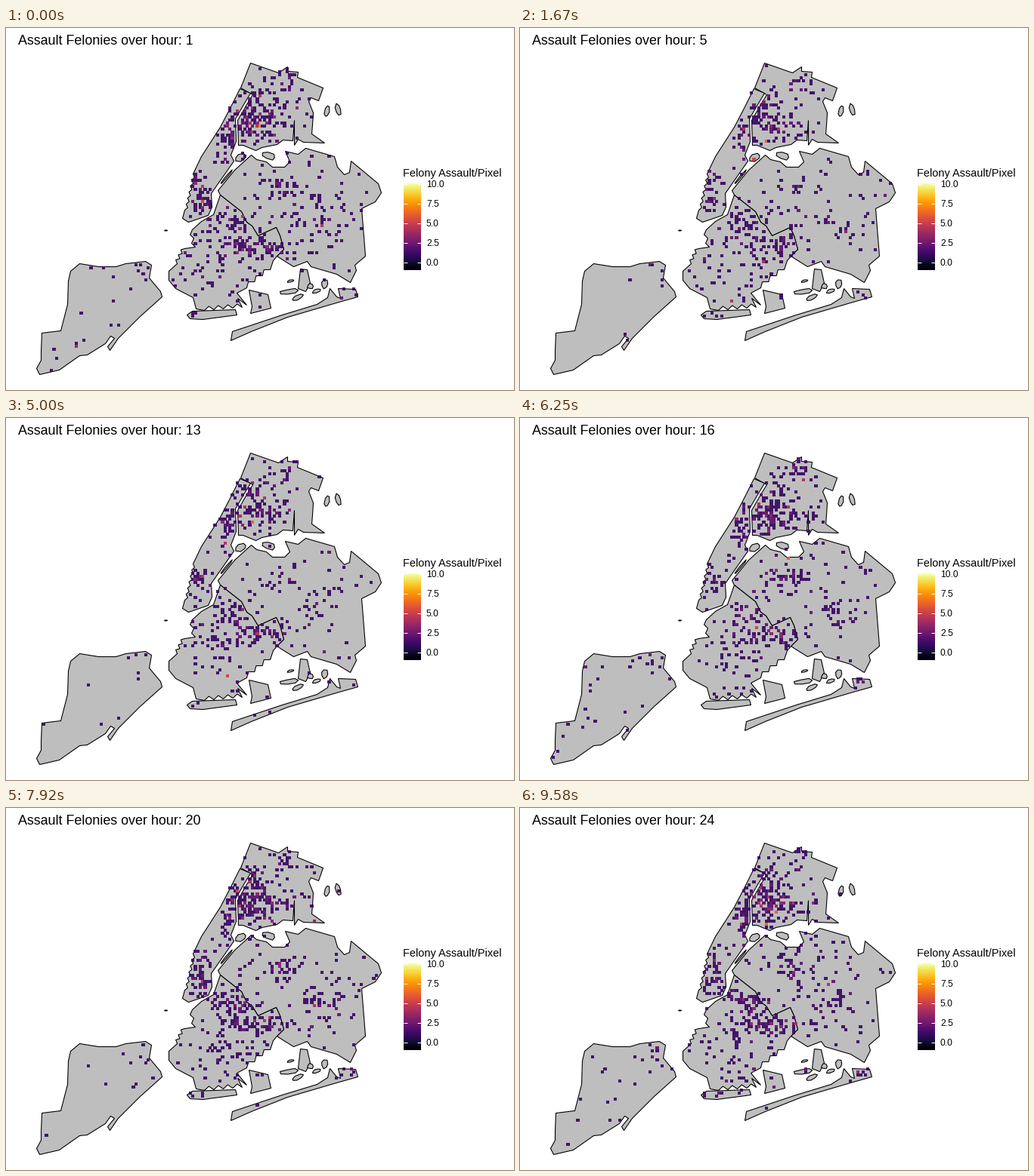
These frames come from a looping animation (672x480 px, 10000 ms). A matplotlib script:

```python
import numpy as np
import matplotlib.pyplot as plt
from matplotlib.animation import FuncAnimation
from matplotlib.patches import Polygon
from matplotlib.path import Path

W, H, DPI = 672, 480, 96
HOURS, LOOP_MS, STEP_MS = 24, 10000, 40
PX = 72 / DPI                      # points per pixel
CELL_X0, CELL_W, CELL_H = 42.1, 3.28, 4
COLS, ROWS = 140, 115
V_MIN, V_MAX = -1, 10
INFERNO = plt.get_cmap("inferno")

fig = plt.figure(figsize=(W / DPI, H / DPI), dpi=DPI, facecolor="white")
ax = fig.add_axes([0, 0, 1, 1])
ax.axis("off")

shapes = []
shape_rng = np.random.default_rng(3)


def land(points):
    shapes.append(Path(points))
    ax.add_patch(Polygon(np.array(points) + 0.5, closed=True, fc="#bebebe", ec="black",
                         lw=1.1 * PX, joinstyle="miter", zorder=1))


def jag(start, end, teeth, depth):
    """Zigzag shore from start to end, cutting in to one side."""
    (x0, y0), (x1, y1) = start, end
    t = np.linspace(0, 1, 2 * teeth + 1)
    cut = depth * (np.arange(len(t)) % 2) / np.hypot(x1 - x0, y1 - y0)
    return list(zip(x0 + t * (x1 - x0) + cut * (y1 - y0),
                    y0 + t * (y1 - y0) - cut * (x1 - x0)))


def islet(x, y, rx, ry, tilt=0, sides=7):
    """Small uneven island."""
    a = np.linspace(0, 2 * np.pi, sides, endpoint=False)
    r = shape_rng.uniform(0.75, 1.15, sides)
    u, v = rx * r * np.cos(a), ry * r * np.sin(a)
    c, s = np.cos(np.radians(tilt)), np.sin(np.radians(tilt))
    land(list(zip(x + u * c - v * s, y + u * s + v * c)))


staten = [(85, 322), (97, 312), (122, 316), (145, 316), (158, 312), (184, 309), (192, 314),
          (189, 331), (204, 349), (206, 356), (177, 382), (148, 411), (137, 427), (134, 422),
          (143, 411), (138, 408), (131, 418), (107, 433), (97, 434), (70, 453), (44, 459),
          (40, 451), (46, 440), (46, 428), (47, 404), (72, 401), (81, 366), (82, 335)]
bronx = [(323, 46), (360, 59), (372, 51), (372, 57), (386, 58), (385, 65), (419, 79),
         (413, 96), (403, 92), (400, 97), (406, 112), (405, 128), (404, 140), (421, 152),
         (393, 151), (386, 147), (381, 155), (381, 122), (379, 149), (366, 148), (358, 154),
         (338, 158), (330, 162), (313, 155), (307, 155), (306, 122), (318, 101), (326, 88),
         (310, 79)]
manhattan = [(309, 80), (323, 86), (314, 101), (303, 120), (304, 150), (297, 168),
             (301, 176), (271, 219), (272, 237), (267, 248), (241, 257), (233, 252),
             *jag((236, 241), (247, 193), 6, -3), (258, 170), (283, 131), (296, 106)]
border = [(358, 302), (367, 293), (362, 275), (357, 264), (333, 275), (325, 262),
          (318, 257), (311, 243), (283, 221)]
queens = [(280, 215), (302, 188), (324, 168), (331, 174), (344, 177), (352, 184),
          (368, 184), (375, 177), (369, 163), (386, 167), (396, 159), (434, 170),
          (438, 184), (447, 194), (454, 191), (456, 176), (492, 206), (496, 218),
          (488, 230), (470, 239), (475, 302), (461, 314), (463, 321), (455, 337),
          (437, 326), (403, 316), (398, 309), (380, 316), (364, 306)]
brooklyn = [(274, 247), (258, 256), *jag((246, 267), (250, 290), 2, -4),
            *jag((236, 292), (226, 312), 3, -4), (215, 322), (215, 334), (224, 345),
            (247, 357), (251, 372), *jag((262, 374), (312, 370), 4, 5), (306, 358),
            (318, 367), (305, 351), *jag((318, 344), (349, 320), 3, 5), (353, 308)]
rockaway = [(297, 414), (299, 402), (365, 380), (411, 366), (425, 357), (428, 345),
            (437, 356), (442, 358), (439, 345), (462, 346), (465, 356), (440, 363),
            (372, 383), (324, 402)]

land(staten)
land(bronx)
land(manhattan)
land(queens + border)
land(brooklyn + border)
land(rockaway)
land([(239, 380), (246, 375), (303, 373), (305, 380), (260, 386), (243, 385)])
land([(321, 347), (346, 353), (350, 371), (323, 378), (325, 369)])
land([(389, 319), (398, 320), (402, 338), (396, 349), (386, 345)])
islet(310, 171, 9, 5, -20)
islet(347, 169, 10, 5, 15)
islet(291, 197, 12, 1.2, -51)
islet(424, 110, 3, 8, 10)
islet(439, 108, 4, 8, -10)
islet(211, 268, 2, 0.5)
islet(374, 349, 12, 3.5, -8)
islet(376, 335, 5, 1.5, -15)
islet(385, 357, 9, 3, -25)
islet(402, 342, 4, 3.5)
islet(410, 348, 6, 2.5, -20)
islet(421, 339, 5, 6)

# Hot spots: centre x, y, spread x, y, expected events per cell
SPOTS = [
    (324, 120, 14, 20, 1.1), (348, 128, 20, 10, .45), (370, 70, 6, 9, .6),
    (350, 100, 32, 36, .12), (297, 145, 8, 17, 1.0), (256, 210, 8, 13, .7),
    (258, 235, 9, 8, .5), (328, 290, 24, 7, .75), (303, 260, 16, 10, .6),
    (285, 310, 34, 34, .17), (255, 378, 8, 4, .5), (413, 257, 14, 10, .4),
    (356, 210, 12, 6, .75), (390, 230, 70, 50, .06), (450, 354, 8, 6, .4),
    (180, 322, 14, 10, .2)]

cx = CELL_X0 + CELL_W * (np.arange(COLS) + 0.5)
cy = CELL_H * (np.arange(ROWS) + 0.5)
gx, gy = np.meshgrid(cx, cy)
centres = np.column_stack([gx.ravel(), gy.ravel()])
on_land = np.any([s.contains_points(centres) for s in shapes], axis=0).reshape(gx.shape)

density = np.full(gx.shape, 0.013)
for x, y, sx, sy, peak in SPOTS:
    density += peak * np.exp(-((gx - x) / sx) ** 2 / 2 - ((gy - y) / sy) ** 2 / 2)
rough = np.random.default_rng(7).normal(size=gx.shape)
density *= on_land * np.exp(0.6 * rough - 0.18)


def hour_counts(hour):
    """Events per cell: a daily wave over the density, plus a few clusters."""
    rng = np.random.default_rng(100 + hour)
    level = 0.75 + 0.22 * np.cos(2 * np.pi * (hour - 21) / 24)
    counts = np.minimum(rng.poisson(density * level), 4)
    hot = rng.choice(density.size, 6, p=(density / density.sum()).ravel())
    counts.flat[hot] += rng.integers(2, 6, hot.size)
    return np.minimum(counts, V_MAX)


def raster(hour):
    counts = hour_counts(hour)
    img = np.zeros((H, W, 4))
    for r, c in zip(*np.nonzero(counts)):
        left = CELL_X0 + CELL_W * c
        x0, x1 = int(left), int(np.ceil(left + CELL_W))
        y0 = r * CELL_H
        color = INFERNO((counts[r, c] - V_MIN) / (V_MAX - V_MIN))
        img[y0:y0 + CELL_H, x0:x1] = (*color[:3], 0.93)
    return img


def label(x, y, text, size):
    return ax.text(x, y, text, fontsize=size * PX, family="Liberation Sans", color="black")


# Legend
label(525, 197.5, "Felony Assault/Pixel", 14.55)
BAR_L, BAR_R, BAR_T, BAR_B = 526, 549, 206, 321
ax.imshow(np.linspace(1, 0, 230)[:, None], cmap=INFERNO, vmin=0, vmax=1, aspect="auto",
          extent=(BAR_L, BAR_R, BAR_B, BAR_T), interpolation="nearest", zorder=2)
for value in np.linspace(0, 10, 5):
    y = 310.5 - 10.4 * value
    for x0, x1 in ((BAR_L, BAR_L + 5), (BAR_R - 5, BAR_R)):
        ax.plot([x0, x1], [y, y], color="white", lw=PX, solid_capstyle="butt", zorder=3)
    label(556, y + 4.5, f"{value:.1f}", 12)

title = label(15.5, 22, "", 17.85)
cells = ax.imshow(np.zeros((H, W, 4)), extent=(0, W, H, 0), aspect="auto",
                  interpolation="nearest", zorder=2)
ax.set_xlim(0, W)
ax.set_ylim(H, 0)

rasters = [raster(h + 1) for h in range(HOURS)]


def update(i):
    # A step takes the hour reached by its end, so no change comes late
    k = ((i + 1) * STEP_MS - 1) * HOURS // LOOP_MS
    title.set_text(f"Assault Felonies over hour: {k + 1}")
    cells.set_data(rasters[k])
    return title, cells


anim = FuncAnimation(fig, update, frames=LOOP_MS // STEP_MS, interval=STEP_MS,
                     repeat=True, repeat_delay=0)
plt.show()
```
